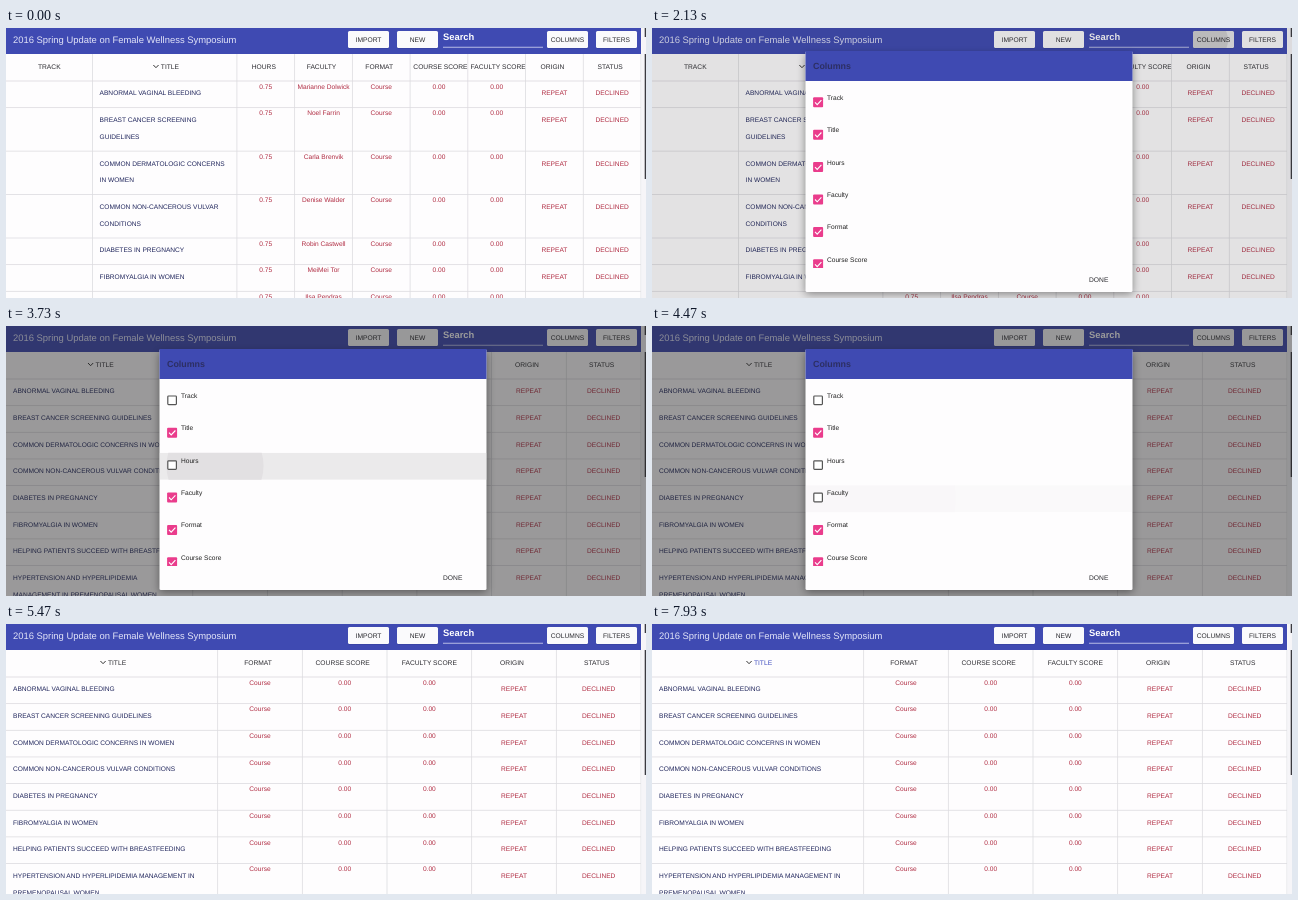
Recreate the animation shown at these times as an HTML page. Size 640 by 270 pixels, loop 8 s.

```html
<!DOCTYPE html>
<html lang="en">
<head>
<meta charset="utf-8">
<title>Course table</title>
<style>
html, body { margin: 0; width: 100%; height: 100%; overflow: hidden; background: #fff; }
svg { display: block; width: 640px; height: 270px; }
text { font-family: "Liberation Sans", Arial, sans-serif; font-size: 6.6px; text-rendering: geometricPrecision; }
</style>
</head>
<body>
<svg viewBox="0 0 640 270">
  <defs>
    <clipPath id="list"><rect x="153.5" y="53" width="327" height="187"/></clipPath>
    <clipPath id="colBtn"><rect x="541" y="3" width="41" height="17" rx="1.5"/></clipPath>
    <filter id="blur" x="-10%" y="-10%" width="120%" height="120%"><feGaussianBlur stdDeviation="4"/></filter>
  </defs>
  <g id="table"></g>
  <g id="bar"></g>
  <g id="overlay"></g>
</svg>
<script>
const LOOP = 8000, WIDTH = 635, TOP = 53;
const BLUE = '#3f4ab2', NAVY = '#20265c', RED = '#b02c42', INK = '#2b2b30', PINK = '#ea3c8c';
const $ = id => document.getElementById(id);
const clamp = v => Math.min(1, Math.max(0, v));
const ramp = (t, a, b) => clamp((t - a) / (b - a));
const easeOut = v => 1 - (1 - v) ** 3;

const columns = [
  ['TRACK', 1.5], ['TITLE', 2.5], ['HOURS', 1], ['FACULTY', 1], ['FORMAT', 1],
  ['COURSE SCORE', 1], ['FACULTY SCORE', 1], ['ORIGIN', 1], ['STATUS', 1]
];
const values = { HOURS: '0.75', FORMAT: 'Course', 'COURSE SCORE': '0.00',
  'FACULTY SCORE': '0.00', ORIGIN: 'REPEAT', STATUS: 'DECLINED' };
const courses = [
  ['ABNORMAL VAGINAL BLEEDING', 'Marianne Dolwick'],
  ['BREAST CANCER SCREENING GUIDELINES', 'Noel Farrin'],
  ['COMMON DERMATOLOGIC CONCERNS IN WOMEN', 'Carla Brenvik'],
  ['COMMON NON-CANCEROUS VULVAR CONDITIONS', 'Denise Walder'],
  ['DIABETES IN PREGNANCY', 'Robin Castwell'],
  ['FIBROMYALGIA IN WOMEN', 'MeiMei Tor'],
  ['HELPING PATIENTS SUCCEED WITH BREASTFEEDING', 'Ilsa Pendras'],
  ['HYPERTENSION AND HYPERLIPIDEMIA MANAGEMENT IN PREMENOPAUSAL WOMEN', ''],
  ['OVARIAN CANCER: TOP 25 QUESTIONS ASKED BY PATIENTS', ''],
  ['SIDE EFFECTS CAN BE A BONUS! BENEFITS OF CONTRACEPTIVES BEYOND PREGNANCY PREVENTION', ''],
  ['WEIGHT LOSS SURGERY IN WOMEN', '']
];
const byTitle = [0, 1, 2, 3, 4, 5, 6, 7];
const byFormat = [9, 4, 0, 7, 10, 8, 2];

const options = ['Track', 'Title', 'Hours', 'Faculty', 'Format', 'Course Score'];
const clicks = { Track: 3000, Hours: 3500, Faculty: 4020 };
const TOGGLE = 180, OPEN = 1900, CLOSE = 4850, SORT_FORMAT = 6100, SORT_TITLE = 7200;

const rect = (x, y, w, h, fill, extra = '') =>
  `<rect x="${x}" y="${y}" width="${w}" height="${h}" fill="${fill}" ${extra}/>`;
const text = (x, y, s, fill, extra = 'text-anchor="middle"') =>
  `<text x="${x}" y="${y}" fill="${fill}" ${extra}>${s}</text>`;
const sized = (size, more = '') => `style="font-size:${size}px;${more}"`;

const pen = document.createElement('canvas').getContext('2d');
pen.font = '66px "Liberation Sans", Arial, sans-serif';
const measure = s => pen.measureText(s).width / 10;

function wrap(s, width) {
  const lines = [''];
  for (const word of s.split(' ')) {
    const last = lines.length - 1;
    const next = lines[last] ? lines[last] + ' ' + word : word;
    if (measure(next) > width && lines[last]) lines.push(word);
    else lines[last] = next;
  }
  return lines;
}

function headCell(name, x, w, state) {
  const sorted = state.sort === name;
  let cx = x + w / 2;
  if (sorted) cx += name === 'TITLE' ? 5.2 : 3;
  else if (name.includes('SCORE') && w < 62) cx += 1.5;
  else if (!['TRACK', 'TITLE', 'FACULTY SCORE'].includes(name)) cx -= 2;
  let out = '';
  if (state.hover === name) out += rect(x + w / 2 - 20.5, 30, 41, 16.5, '#e9e9ed', 'rx="1"');
  out += text(cx, 40.6, name, state.blue.includes(name) ? '#4250c0' : INK, 'text-anchor="middle" ' + sized(6.7));
  if (sorted) {
    const ax = cx - measure(name) / 2 - 5;
    out += `<path d="M${ax - 2.6} 37l2.6 2.7l2.6 -2.7" fill="none" stroke="#333" stroke-width="1"/>`;
  }
  return out;
}

function drawTable(state) {
  const cols = columns.filter(c => !state.hidden.includes(c[0]));
  const unit = WIDTH / cols.reduce((sum, c) => sum + c[1], 0);
  let x = 0, out = rect(0, 0, 640, 270, '#fefdfe');
  const cells = cols.map(([name, weight]) => {
    const cell = { name, x, w: weight * unit };
    x += cell.w;
    out += headCell(name, cell.x, cell.w, state);
    out += rect(x - .4, 26, .8, 244, '#dddce0');
    return cell;
  });
  out += rect(0, TOP - .4, WIDTH, .8, '#d9d8dc');
  const titleCell = cells.find(c => c.name === 'TITLE');
  let y = TOP;
  for (const i of state.sort === 'TITLE' ? byTitle : byFormat) {
    const [title, faculty] = courses[i];
    const lines = wrap(title, titleCell.w - 13);
    lines.forEach((s, k) => out += text(titleCell.x + 7, y + 14.4 + k * 16.8, s, NAVY, ''));
    for (const c of cells) {
      const s = c.name === 'FACULTY' ? faculty : values[c.name];
      if (!s) continue;
      const low = c.name === 'ORIGIN' || c.name === 'STATUS';
      out += text(c.x + c.w / 2, y + (low ? 14.4 : 7.6), s, RED);
    }
    y += 26.65 + (lines.length - 1) * 16.8;
    out += rect(0, y - .4, WIDTH, .8, '#dddce0');
  }
  out += rect(635.4, 0, 4.6, 270, '#f6f5f8') + rect(638.7, 0, 1.3, 9, '#3a3a40') + rect(638.7, 26, 1.3, 125, '#3a3a40');
  return out;
}

const button = (x, label) => rect(x, 3.6, 41, 17, '#20286e', 'rx="1.5" opacity=".4"') +
  rect(x, 3, 41, 17, '#fafafc', 'rx="1.5"') +
  text(x + 20.5, 14.2, label, INK, 'text-anchor="middle" ' + sized(6.7));

// Press strength: quick rise, short hold, slow fade.
const press = (t, start) => ramp(t, start, start + 80) * (1 - ramp(t, start + 250, start + 500));

function drawBar(t) {
  const p = ramp(t, 1780, 1880) * (1 - ramp(t, 2200, 2450));
  let out = rect(0, 0, WIDTH, 26, BLUE) +
    text(7, 15.2, '2016 Spring Update on Female Wellness Symposium', '#e2e4f8', sized(9.43)) +
    button(342, 'IMPORT') + button(391, 'NEW') + button(541, 'COLUMNS') + button(590, 'FILTERS') +
    text(437, 12, 'Search', '#fff', sized(9.4, 'font-weight:bold')) +
    rect(437, 18.8, 100, .8, '#d5d8f2');
  if (p > 0) {
    out += `<g clip-path="url(#colBtn)" opacity="${p}">` + rect(541, 3, 41, 17, '#000', 'opacity=".08"') +
      `<circle cx="555" cy="12" r="${Math.max(0, t - 1780) * .06}" opacity=".1"/></g>`;
  }
  return out;
}

function checkbox(cy, on) {
  if (!on) return rect(161.8, cy - 4.3, 8.6, 8.6, '#fff', 'rx=".8" stroke="#555" stroke-width="1.2"');
  return rect(161.1, cy - 5, 10, 10, PINK, 'rx="1"') +
    `<path d="M163 ${cy}l2.2 2.3l4.2 -4.5" fill="none" stroke="#fff" stroke-width="1.1"/>`;
}

function drawOption(name, i, t) {
  const y = 62 + i * 32.4, start = clicks[name];
  let out = '';
  if (start && t >= start) {
    const dt = t - start, p = press(t, start);
    out += `<clipPath id="row${i}">${rect(153.5, y, 327, 27, '#000')}</clipPath>` +
      `<g clip-path="url(#row${i})" opacity="${p}">` + rect(153.5, y, 327, 27, '#ebeaeb') +
      `<circle cx="209" cy="${y + 13}" r="${dt * .21}" fill="#e2e0e2"/></g>`;
  }
  const on = !(start && t >= start + TOGGLE);
  return out + checkbox(y + 12.3, on) + text(175, y + 9.7, name, '#222', '');
}

function drawOverlay(t) {
  if (t < OPEN || t > CLOSE + 350) return '';
  const shade = .45 * ramp(t, 2050, 2350) * (1 - ramp(t, CLOSE, CLOSE + 330));
  const shown = easeOut(ramp(t, OPEN, 2120)) * (1 - ramp(t, CLOSE, CLOSE + 250));
  const scale = .5 + shown / 2, away = 1 - shown;
  const cx = 317 + away * 244, cy = 143.5 - away * 132;
  const done = Math.max(ramp(t, 2300, 2500) * (1 - ramp(t, 3180, 3300)), ramp(t, 4680, 4760));
  let out = rect(0, 0, 640, 270, '#212121', `opacity="${shade}"`);
  out += `<g opacity="${shown}" transform="translate(${cx} ${cy}) scale(${scale}) translate(-317 -143.5)">` +
    rect(153.5, 27, 327, 239, '#000', 'opacity=".42" filter="url(#blur)"') +
    rect(153.5, 23, 327, 241, '#fefdfe', 'rx="1.5"') + rect(153.5, 23, 327, 30, BLUE) +
    text(161, 40.8, 'Columns', '#2d2f63', sized(8.9, 'font-weight:bold;font-family:"Liberation Serif",Times,serif')) +
    '<g clip-path="url(#list)">' + options.map((name, i) => drawOption(name, i, t)).join('') + '</g>' +
    rect(426.5, 244, 41, 16, '#ebebec', `rx="1" opacity="${done}"`) +
    text(446.7, 254.3, 'DONE', INK, 'text-anchor="middle" ' + sized(6.7)) + '</g>';
  return out;
}

function tableState(t) {
  const hidden = Object.keys(clicks).filter(k => t >= clicks[k] + TOGGLE).map(k => k.toUpperCase());
  const sort = t >= SORT_FORMAT && t < SORT_TITLE ? 'FORMAT' : 'TITLE';
  const blue = [];
  if (t >= 5950 && t < SORT_TITLE) blue.push('FORMAT');
  if (t >= 6650) blue.push('TITLE');
  const hover = t >= 5950 && t < 6500 ? 'FORMAT' : t >= 6650 && t < 7400 ? 'TITLE' : '';
  return { hidden, sort, blue, hover };
}

const cache = {};
function put(id, markup) {
  if (cache[id] === markup) return;
  cache[id] = markup;
  $(id).innerHTML = markup;
}

let lastKey;
function render(t) {
  const state = tableState(t), key = JSON.stringify(state);
  if (key !== lastKey) put('table', drawTable(state));
  lastKey = key;
  put('bar', drawBar(t));
  put('overlay', drawOverlay(t));
}

const began = performance.now();
function tick() {
  render((performance.now() - began) % LOOP);
  requestAnimationFrame(tick);
}
tick();
</script>
</body>
</html>
```
